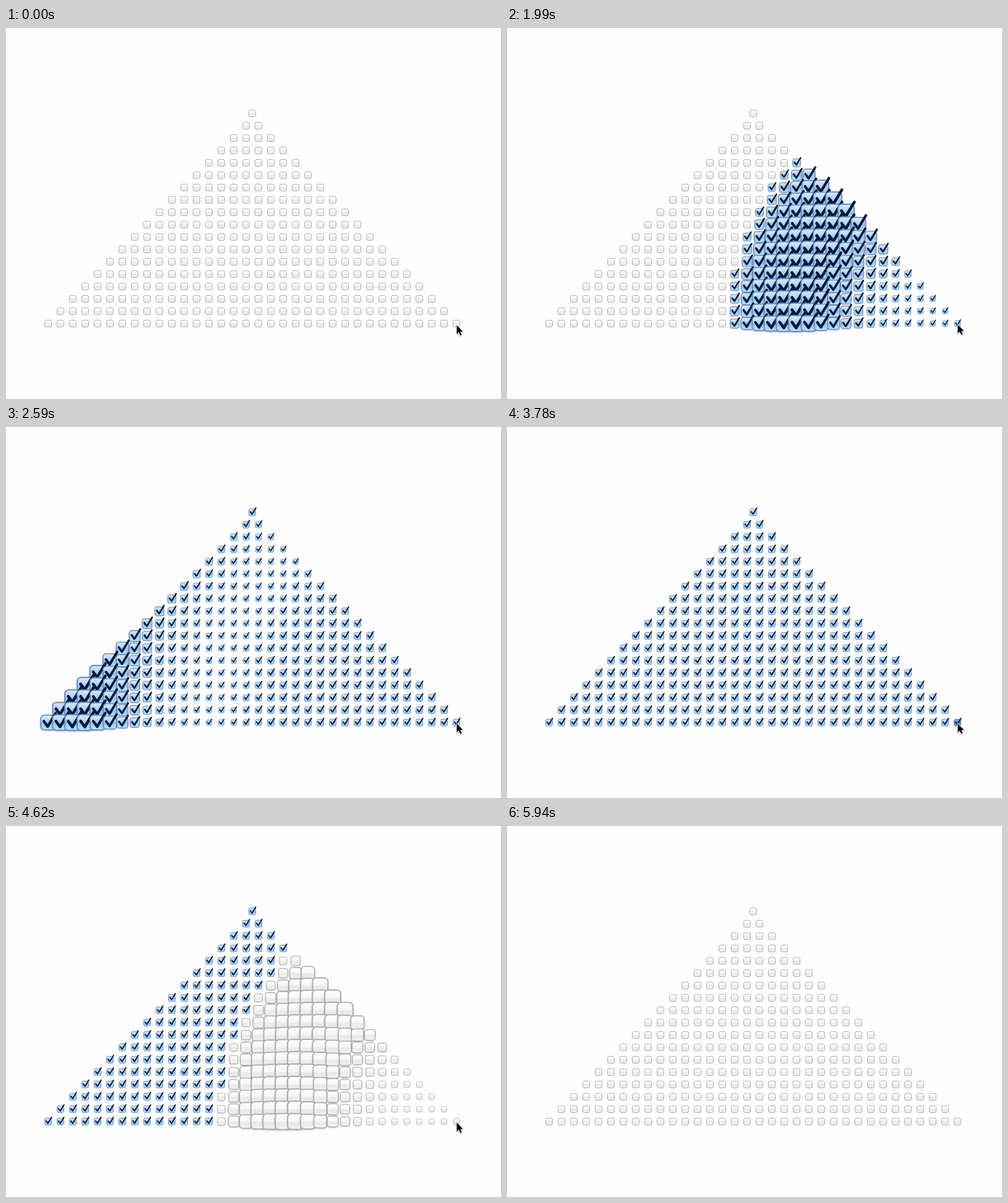
An HTML page with a canvas that plays this animation: 800 by 600 pixels, repeating every 6340 ms.

```html
<!DOCTYPE html>
<html lang="en">
<head>
<meta charset="utf-8">
<title>Checkbox wave</title>
<style>
  html, body { margin: 0; width: 100%; height: 100%; overflow: hidden; background: #fefefe; }
  canvas { display: block; }
</style>
</head>
<body>
<canvas id="stage" width="800" height="600"></canvas>
<script>
const ctx = document.getElementById('stage').getContext('2d');
const LOOP = 6340, SPEED = 0.58, CHECK = 1347, UNCHECK = 3960;
const ORIGIN = { x: 728, y: 478 };

// The picture advances in steps: [from, to, intervals]
const ticks = [0, 480];
for (const [from, to, n] of [
  [1200, 1760, 7], [1850, 1990, 2], [2070, 2410, 4], [2500, 2590, 1],
  [2680, 3120, 5], [3210, 3300, 1], [3780, 3780, 1], [3930, 4560, 11],
  [4620, 4620, 1], [4680, 4970, 4], [5060, 5240, 2], [5330, 5940, 7]
]) for (let i = 0; i <= n; i++) ticks.push(Math.round(from + (to - from) * i / n));

// Triangle of boxes, row by row
const boxes = [];
function addBox(x, y) {
  boxes.push({ x, y, delay: Math.hypot(ORIGIN.x - x, ORIGIN.y - y) / SPEED });
}
addBox(398, 138);
for (let row = 1; row < 18; row++)
  for (let x = 408 - 20 * row; x <= 388 + 20 * row; x += 20) addBox(x, 138 + 20 * row);

function gradient(...stops) {
  const g = ctx.createLinearGradient(0, -5.5, 0, 5.5);
  for (const [at, color] of stops) g.addColorStop(at, color);
  return g;
}
const fills = {
  off: gradient([0, '#ffffff'], [0.48, '#f5f5f5'], [0.54, '#e9e9e9'], [1, '#f1f1f1']),
  on: gradient([0, '#d8ebfc'], [0.45, '#a9d1f6'], [0.52, '#8fc4f2'], [1, '#b9e5ff']),
  offDown: gradient([0, '#d6d6d6'], [0.5, '#c2c2c2'], [1, '#d2d2d2']),
  onDown: gradient([0, '#8fb9ee'], [0.5, '#4683dc'], [1, '#78b4f4'])
};

// CSS "ease": cubic-bezier(.25, .1, .25, 1)
function ease(t) {
  let lo = 0, hi = 1;
  for (let i = 0; i < 16; i++) {
    const u = (lo + hi) / 2;
    if (0.75 * u * (1 - u) + u ** 3 < t) lo = u; else hi = u;
  }
  return 0.3 * lo * (1 - lo) ** 2 + 3 * lo * lo * (1 - lo) + lo ** 3;
}

// Pop up, dip below full size, settle
const pose = [[-15, 1], [200, 2.35], [600, 0.8], [800, 1]];
function scaleAt(age) {
  if (age < 0 || age >= 800) return 1;
  const i = pose.findIndex(([end]) => age < end);
  const [t0, s0] = pose[i - 1], [t1, s1] = pose[i];
  return s0 + (s1 - s0) * ease((age - t0) / (t1 - t0));
}

function path(points, close) {
  ctx.beginPath();
  points.forEach(([x, y]) => ctx.lineTo(x, y));
  if (close) ctx.closePath();
}

function shadow(alpha, blur, dy) {
  ctx.shadowColor = `rgba(0,0,0,${alpha})`;
  ctx.shadowBlur = blur;
  ctx.shadowOffsetY = dy;
}

function drawBox(box, checked, pressed, scale) {
  ctx.save();
  ctx.translate(box.x, box.y);
  ctx.scale(scale, scale);
  ctx.beginPath();
  ctx.roundRect(-5.5, -5.5, 11, 11, 2.6);
  if (scale > 1.05) shadow(0.4, 1.6 * scale, 0.4 * scale);
  else shadow(0.12, 1, 0.5);
  ctx.fillStyle = fills[(checked ? 'on' : 'off') + (pressed ? 'Down' : '')];
  ctx.fill();
  shadow(0, 0, 0);
  ctx.lineWidth = scale > 1 ? 0.85 : 1;
  ctx.strokeStyle = checked ? '#6d8db9' : '#afafaf';
  ctx.stroke();
  if (checked) {
    path([[-3.2, -1], [-0.3, 3], [5.7, -7]]);
    ctx.lineWidth = 2;
    ctx.lineCap = ctx.lineJoin = 'round';
    ctx.strokeStyle = '#08183a';
    ctx.stroke();
  }
  ctx.restore();
}

function drawCursor(t) {
  const drop = 25 * (Math.max(0, t - 5160) / 80) ** 1.5;
  ctx.save();
  ctx.translate(728.5 + drop * 0.05, (t < 480 ? 480.5 : 479.5) + drop);
  path([[0, 0], [0, 14.5], [3.3, 11.4], [5.6, 16.8], [8, 15.8], [5.7, 10.6], [10, 10.6]], true);
  shadow(0.35, 2, 1);
  ctx.lineWidth = 1.6;
  ctx.lineJoin = 'round';
  ctx.strokeStyle = '#fff';
  ctx.stroke();
  shadow(0, 0, 0);
  ctx.fillStyle = '#000';
  ctx.fill();
  ctx.restore();
}

function draw(t) {
  ctx.fillStyle = '#fefefe';
  ctx.fillRect(0, 0, 800, 600);
  const down = (t >= 1200 && t < CHECK) || (t >= 3780 && t < 3930);
  for (const box of boxes) {
    const sinceOn = t - CHECK - box.delay, sinceOff = t - UNCHECK - box.delay;
    const pressed = down && box.delay === 0;
    drawBox(box, sinceOn >= 0 && sinceOff < 0, pressed, scaleAt(sinceOff < 0 ? sinceOn : sinceOff));
  }
  drawCursor(t);
}

let shown = -1;
function frame() {
  const now = performance.now() % LOOP;
  const t = ticks.findLast(tick => tick <= now);
  if (t !== shown) draw(shown = t);
  requestAnimationFrame(frame);
}
frame();
</script>
</body>
</html>
```
